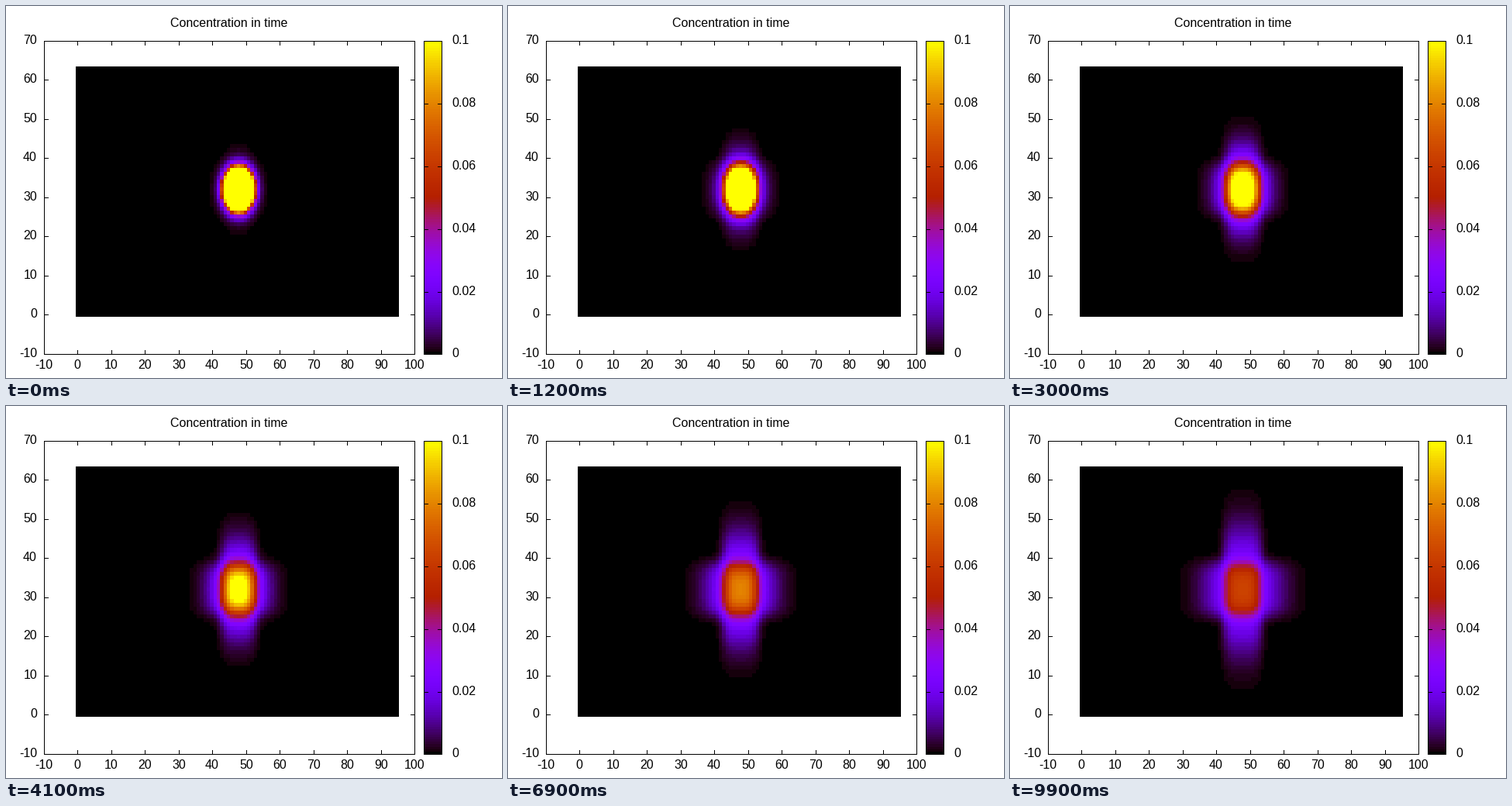
These frames come from a looping animation (640x480 px, 10000 ms). A matplotlib script:

```python
import math

import numpy as np
import matplotlib.pyplot as plt
from matplotlib.animation import FuncAnimation

W, H, DPI = 640, 480, 100
FRAMES, INTERVAL = 100, 100
NX, NY = 96, 64
LEVELS, CMAX = 128, 0.1

LEFT, RIGHT, TOP, BOTTOM = 49, 527, 45, 449
MAP_L, MAP_R, MAP_T, MAP_B = 90, 507, 78, 401
BAR_L, BAR_R = 539, 562
TICK = 5

plt.rcParams["font.family"] = "Liberation Sans"
plt.rcParams["font.size"] = 16 * 72 / DPI


def palette(level):
    """Black-violet-red-yellow map: sqrt, cube and sine channels."""
    g = np.clip(level, 0, LEVELS - 1) / (LEVELS - 1)
    rgb = np.stack([np.sqrt(g), g**3, np.sin(2 * np.pi * g)], axis=-1)
    return np.clip(rgb, 0, 1)


def cell_of_pixel(pixels, cells):
    edges = pixels * np.arange(1, cells) // cells
    return np.searchsorted(edges, np.arange(pixels), side="right")


cols = cell_of_pixel(MAP_R - MAP_L, NX)
rows = cell_of_pixel(MAP_B - MAP_T, NY)
dx = np.abs(np.arange(NX) - 48)[None, :]
dy = np.abs(np.arange(NY) - 31)[:, None]


def concentration(t):
    """A fading Gaussian spot that feeds a horizontal and a vertical lobe."""
    s = math.sqrt(t)
    spot = 0.85 * math.exp(-t) * np.exp(
        -dx**2 / (9.3 + 2.3 * t) - dy**2 / (14.5 + 4.5 * t))

    height = 0.43 / (t + 3.43) * (1 - 0.88 * math.exp(-t / 2.4))
    drop = math.log(height / (CMAX / LEVELS))
    reach_x = 8.2 + 3.3 * s
    reach_y = 11.0 + 4.07 * t**0.55
    tail = 2 + 0.1 * s
    edge = 2.4 + 0.55 * s
    long_x = np.exp(-drop * (dx / reach_x) ** tail)
    long_y = np.exp(-drop * (dy / reach_y) ** tail)
    short_x = np.exp(-((dx / (4.0 + 0.5 * s)) ** edge))
    short_y = np.exp(-((dy / (5.4 + 0.5 * s)) ** edge))
    return spot + height * (long_x * short_y + short_x * long_y)


def heat_image(frame):
    c = concentration(frame * INTERVAL / 1000)
    colours = palette(np.floor(c / CMAX * LEVELS))
    return colours[rows][:, cols]


canvas = np.ones((H, W, 3))


def hline(x0, x1, y):
    canvas[y, x0:x1 + 1] = 0


def vline(x, y0, y1):
    canvas[y0:y1 + 1, x] = 0


def frame_box(left, right):
    for y in (TOP, BOTTOM):
        hline(left, right, y)
    for x in (left, right):
        vline(x, TOP, BOTTOM)


def side_ticks(left, right, y):
    hline(left, left + TICK, y)
    hline(right - TICK, right, y)


fig = plt.figure(figsize=(W / DPI, H / DPI), dpi=DPI, facecolor="white")
ax = fig.add_axes([0, 0, 1, 1])


def show(img, left, right, top, bottom):
    return ax.imshow(img, extent=(left, right, bottom, top),
                     interpolation="nearest", aspect="auto")


def label(x, baseline, text, ha):
    ax.text(x, baseline, text, ha=ha, va="baseline", color="black")


bar_px = np.arange(TOP, BOTTOM)
bar_level = np.floor((BOTTOM - bar_px - 0.5) / (BOTTOM - TOP) * LEVELS)
canvas[TOP:BOTTOM, BAR_L:BAR_R] = palette(bar_level)[:, None]

frame_box(LEFT, RIGHT)
frame_box(BAR_L, BAR_R)

for v in range(-10, 101, 10):
    x = round(LEFT + (v + 10) * (RIGHT - LEFT) / 110)
    vline(x, TOP, TOP + TICK)
    vline(x, BOTTOM - TICK, BOTTOM)
    label(x, 468, str(v), "center")

for v in range(-10, 71, 10):
    y = math.floor(BOTTOM - (v + 10) * (BOTTOM - TOP) / 80)
    side_ticks(LEFT, RIGHT, y)
    label(40, y + 4, str(v), "right")

for i in range(6):
    y = math.ceil(BOTTOM - i * (BOTTOM - TOP) / 5)
    side_ticks(BAR_L, BAR_R, y)
    label(575, y + 4, f"{i * 0.02:g}", "left")

label(288, 27, "Concentration in time", "center")

show(canvas, 0, W, 0, H)
heat = show(heat_image(0), MAP_L, MAP_R, MAP_T, MAP_B)
ax.set_xlim(0, W)
ax.set_ylim(H, 0)
ax.axis("off")


def update(frame):
    heat.set_data(heat_image(frame))
    return [heat]


anim = FuncAnimation(fig, update, frames=FRAMES, interval=INTERVAL,
                     repeat=True, repeat_delay=0, blit=False)
plt.show()
```
